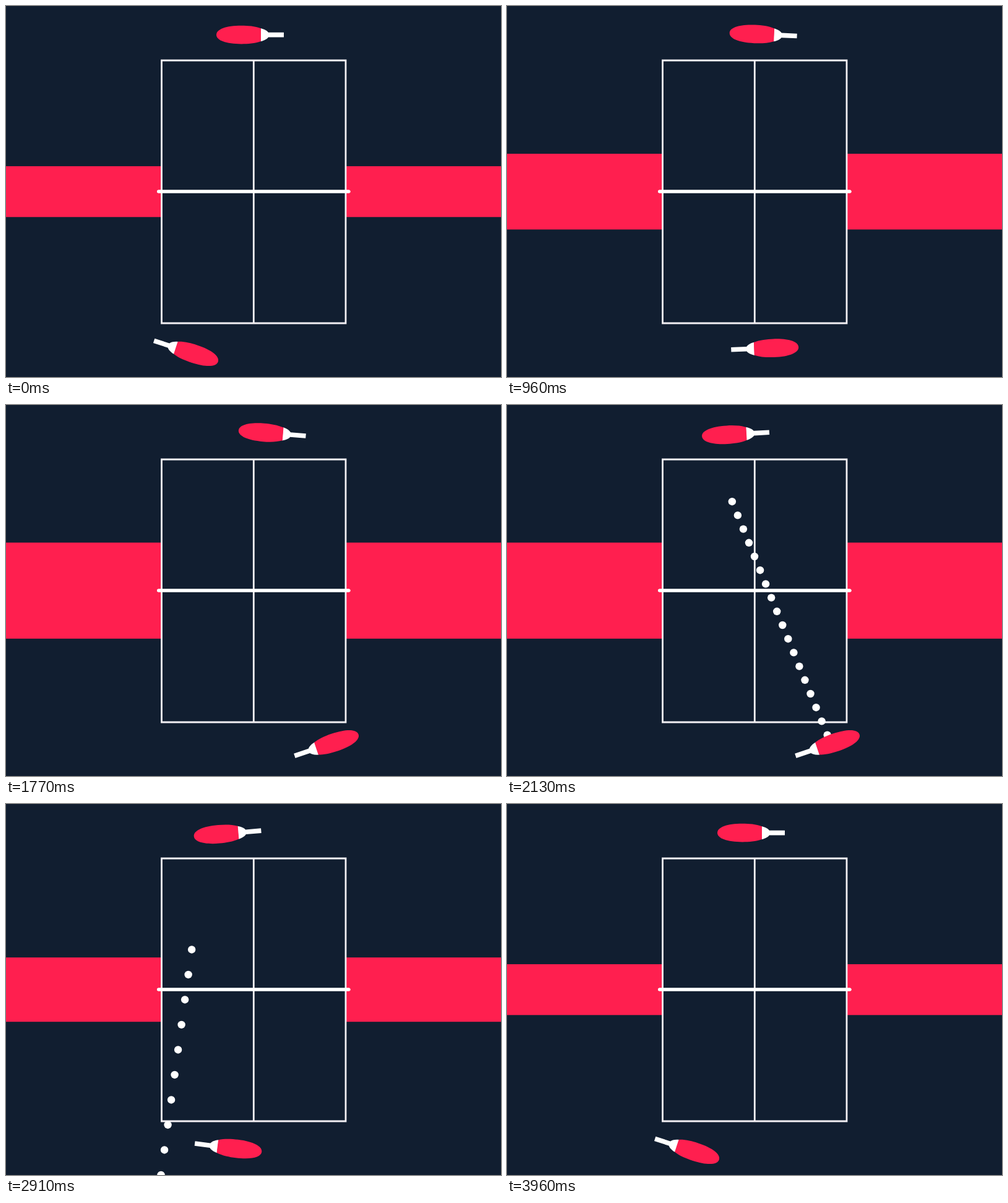
Animation of 800x600 px, one loop 4080 ms. Source, as an HTML page:

```html
<!DOCTYPE html>
<html lang="en">
<head>
<meta charset="utf-8">
<title>Table tennis</title>
<style>
  html, body { margin: 0; width: 100%; height: 100%; overflow: hidden; background: #111e30; }
  svg { display: block; width: 100vw; height: 100vh; }
</style>
</head>
<body>
<svg viewBox="0 0 800 600">
  <defs>
    <!-- Origin is the throat of the paddle, handle to the right -->
    <g id="paddle">
      <path fill="#fff" d="M4-10.6C11-9 15-6 16.5-3.8H41.5V3.8H16.5C15 6 11 9 4 10.6Z"/>
      <path fill="#ff1f4f" d="M4.5-10.4C-5-14-17-14.8-27-14.8C-52-14.8-67.5-9-67.5 0S-52 14.8-27 14.8C-17 14.8-5 14 4.5 10.4Z"/>
    </g>
    <clipPath id="gap"><rect id="gapRect" x="240" width="320"/></clipPath>
  </defs>
  <rect width="800" height="600" fill="#111e30"/>
  <rect id="band" width="800" fill="#ff1f4f"/>
  <rect x="251.5" y="88" width="297.5" height="425" fill="#111e30"/>
  <g clip-path="url(#gap)">
    <path role="img" aria-label="YOU LOSE" fill="none" stroke="#ff1f4f" stroke-width="8" stroke-linejoin="round"
      d="M298 266V302H312M312 266V330H295
         M326 270H341V330H326Z
         M356 266V330H371V266
         M406 266V330H424
         M435 270H451V330H435Z
         M480 284V270H465V300H480V330H465V316
         M511 270H492V330H511M492 300H508"/>
  </g>
  <path d="M251.5 88H549V513H251.5ZM400.3 88V513" fill="none" stroke="#f3f0f4" stroke-width="2.8"/>
  <g stroke="#fff" stroke-width="5" stroke-linecap="round">
    <path id="netTop" d="M246.500 300H554"/>
    <path id="netBottom" d="M246.500 300H554"/>
  </g>
  <g id="trail" fill="#fff"></g>
  <use id="rival" href="#paddle"/>
  <use id="player" href="#paddle"/>
</svg>
<script>
const LOOP = 4080, STEP = 30, LAST = 3960;
const DOTS = 30, DOT_DELAY = 20.67;
const SERVE = 1770, RETURN = 2220.5;
const HOME = 278.6, HIT = 505.7;
const RIVAL_HOME = 407.5, RIVAL_HIT = 371;

const $ = id => document.getElementById(id);
const set = (el, attrs) => { for (const k in attrs) el.setAttribute(k, attrs[k]); };

// Bezier easing with handles (x1, 0) and (x2, 1)
function ease(x, x1, x2) {
  if (x <= 0) return 0;
  if (x >= 1) return 1;
  const curve = (s, a, b) => 3 * (1 - s) ** 2 * s * a + 3 * (1 - s) * s * s * b + s ** 3;
  let lo = 0, hi = 1;
  for (let i = 0; i < 24; i++) {
    const mid = (lo + hi) / 2;
    if (curve(mid, x1, x2) < x) lo = mid; else hi = mid;
  }
  return curve(lo, 0, 1);
}

// Each move is [start, end, value, x1, x2]
function follow(t, value, moves) {
  for (const [start, end, to, x1 = 0.4, x2 = 0.4] of moves) {
    if (t <= start) break;
    value += (to - value) * ease((t - start) / (end - start), x1, x2);
  }
  return value;
}

const playerX = t => follow(t, HOME, [
  [0, 1080, 408, 0.8, 0.6],
  [1080, 1440, 242],
  [1440, 1770, HIT],
  [2190, 3720, HOME, 0.4, 0.25]
]);

const rivalX = t => {
  const mirrored = RIVAL_HOME + (playerX(Math.min(t, SERVE)) - HOME) * 0.157;
  return follow(t, mirrored, [
    [SERVE, 1935, 556],
    [1935, 2190, RIVAL_HIT],
    [2940, 3720, RIVAL_HOME, 0.4, 0.25]
  ]);
};

const netSplit = t => follow(t, 0, [
  [3060, 3420, 52, 0.4, 0.25],
  [3660, 3960, 0, 0.4, 0.25]
]);

function ballAt(t) {
  const n = (t - RETURN) / DOT_DELAY;
  return n < 0 ? [324.2 - 9.05 * n, 59 - 22.2 * n] : [324.2 - 5.515 * n, 59 + 40.5 * n];
}

const dots = Array.from({ length: DOTS }, () => {
  const dot = document.createElementNS("http://www.w3.org/2000/svg", "circle");
  dot.setAttribute("r", 6.2);
  return $("trail").appendChild(dot);
});

function draw(t) {
  const px = playerX(t), rx = rivalX(t);
  const half = 41.1 + (px - HOME) * 0.161;
  const split = netSplit(t);

  set($("band"), { y: 300.2 - half, height: 2 * half });
  set($("player"), { transform: `translate(${px} 554.2) rotate(${180 - (px - 390.5) * 0.1617})` });
  set($("rival"), { transform: `translate(${rx} 46.6) rotate(${(rx - RIVAL_HOME) * 0.132})` });
  set($("netTop"), { transform: `translate(0 ${-split})` });
  set($("netBottom"), { transform: `translate(0 ${split})` });
  set($("gapRect"), { y: 300 - split, height: 2 * split });

  dots.forEach((dot, i) => {
    const time = t - i * DOT_DELAY;
    const [cx, cy] = ballAt(time);
    set(dot, { cx, cy, visibility: time > SERVE && cy < 610 ? "visible" : "hidden" });
  });
}

const begin = performance.now();
function tick() {
  const t = (performance.now() - begin) % LOOP;
  draw(Math.min(Math.floor(t / STEP) * STEP, LAST));
  requestAnimationFrame(tick);
}
tick();
</script>
</body>
</html>
```
